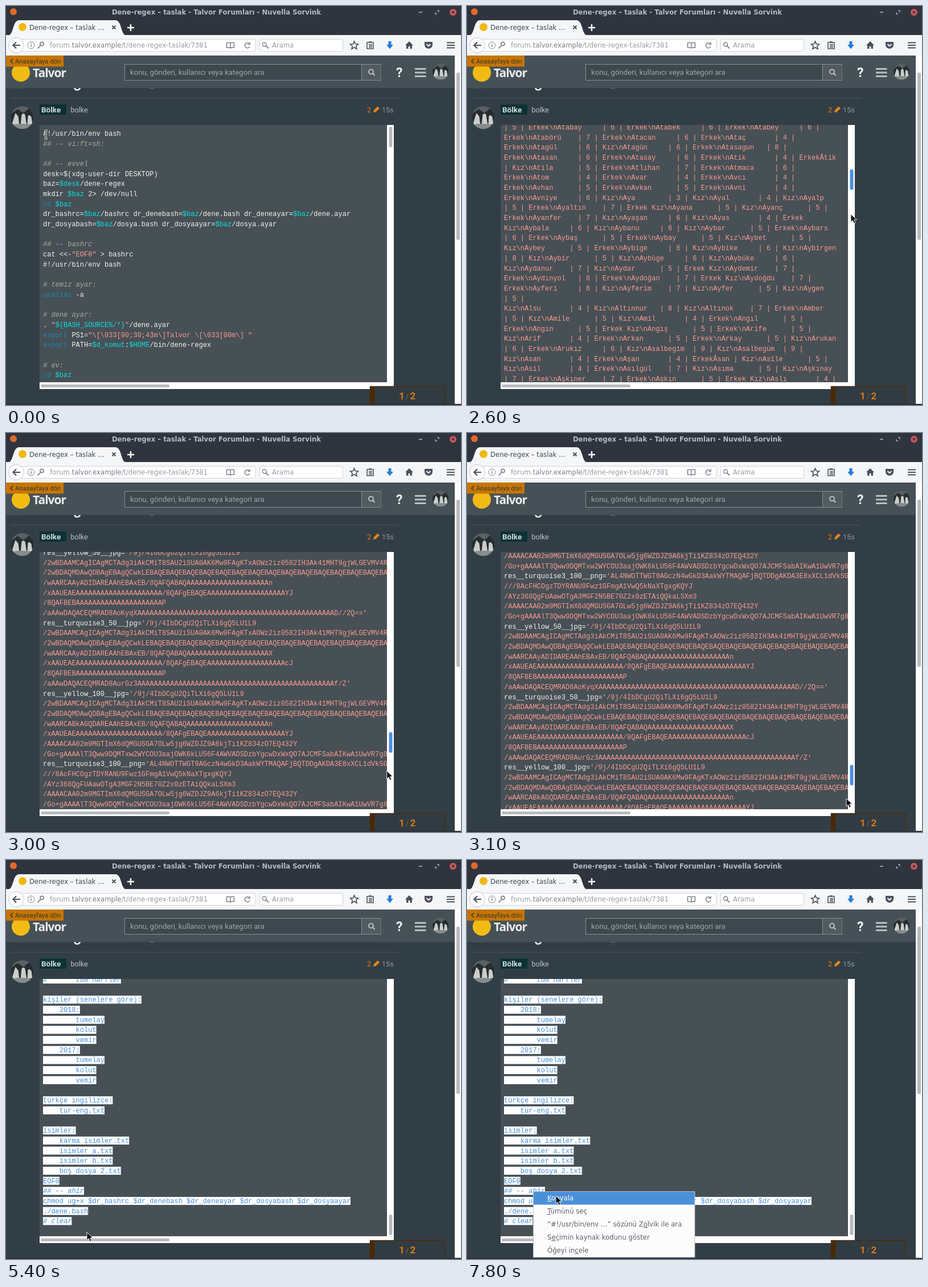
These frames come from a looping animation (799x701 px, 8000 ms). An HTML page:

```html
<!DOCTYPE html>
<html lang="tr">
<head>
<meta charset="utf-8">
<title>Forum</title>
<style>
html, body { margin: 0; width: 100%; height: 100%; overflow: hidden; background: #323e45; }
svg { display: block; }
text { white-space: pre; }
.ui { font: 11.7px "DejaVu Sans", sans-serif; fill: #5c616c; }
.web { font: 12.6px Roboto, sans-serif; fill: #b9c0c4; }
.code { font: 12px "Liberation Mono", monospace; fill: #f4f4ee; }
.com { fill: #aaab96; font-style: italic; }
.key { fill: #1b86b4; }
.var { fill: #08dede; }
.str { fill: #f69a90; }
.sel, .sel tspan { fill: #4590d8; }
.acc { text-decoration: underline; }
.line { fill: none; stroke: #4b505b; stroke-width: 1.6; }
</style>
</head>
<body>
<svg id="stage" width="799" height="701" viewBox="0 0 799 701">
  <defs>
    <clipPath id="round"><circle r="20"/></clipPath>
    <g id="photo" clip-path="url(#round)">
      <rect x="-20" y="-20" width="40" height="40" fill="#596062"/>
      <path d="M-20 -6L-8 -15L2 -8L12 -16L20 -7V20H-20Z" fill="#272d2f"/>
      <path d="M-17 8L-12 -8L-7 -2L-5 14H-18ZM-3 14L-1 -5Q2 -9 5 -5L8 14ZM9 12L10 -3Q13 -6 16 -1L18 12Z" fill="#c9cecb"/>
      <path d="M-20 13Q0 8 20 14V20H-20Z" fill="#868d8c"/>
    </g>
  </defs>

  <!-- window title and tab -->
  <rect width="799" height="52" fill="#2f343f"/>
  <circle cx="13" cy="10" r="6" fill="#e0692c"/>
  <text class="ui" x="369.5" y="15" text-anchor="middle" font-weight="bold" style="font-weight:bold;fill:#b4bac6">Dene-regex – taslak - Talvor Forumları - Nuvella Sorvink</text>
  <path d="M725 11H731" stroke="#a9afbb" stroke-width="1.6"/>
  <path d="M757 8H760V11M754 11V14H757" fill="none" stroke="#a9afbb" stroke-width="1.3"/>
  <circle cx="785" cy="11" r="6" fill="#cc575d"/>
  <path d="M783 9L787 13M787 9L783 13" stroke="#2f343f" stroke-width="1.5"/>
  <path d="M3 52C14 52 11 25 23 25H192C204 25 201 52 212 52Z" fill="#f5f6f7"/>
  <circle cx="29" cy="37" r="7" fill="#efb913"/>
  <text class="ui" x="41" y="42" style="fill:#434853">Dene-regex – taslak …</text>
  <path d="M186.500 34.500L192.500 40.500M192.500 34.500L186.500 40.500" stroke="#4b505b" stroke-width="2"/>
  <path d="M213 38H225M219 32V44" stroke="#fff" stroke-width="2.4"/>

  <!-- toolbar -->
  <rect y="51" width="799" height="36" fill="#f5f6f7"/>
  <rect x="22" y="58.500" width="416" height="21" rx="2" fill="#fff" stroke="#cfd3dc"/>
  <rect x="445.500" y="58.500" width="146" height="21" rx="2" fill="#fff" stroke="#cfd3dc"/>
  <circle cx="18" cy="69" r="13.500" fill="#fcfcfd" stroke="#c4c9d2"/>
  <path class="line" d="M25 69H13M18 63.500L12.500 69L18 74.500" style="stroke-width:2.200"/>
  <circle cx="44" cy="69" r="6" fill="none" stroke="#80858e"/>
  <path d="M44 67.500V72M44 65V66.200" stroke="#80858e" stroke-width="1.500"/>
  <circle cx="63" cy="66.500" r="3" fill="none" stroke="#8b9098" stroke-width="2"/>
  <path d="M61 69L55.500 74.500" stroke="#8b9098" stroke-width="2"/>
  <text class="ui" x="77" y="73" style="fill:#979ba3">forum.<tspan fill="#777c85">talvor.example</tspan>/t/dene-regex-taslak/7381</text>
  <path class="line" d="M394 65V74M387.500 64.500Q391 63.500 394 65.500Q397 63.500 400.500 64.500V73Q397 72.500 394 74Q391 72.500 387.500 73Z" style="stroke-width:1.300;stroke:#6b707a"/>
  <path class="line" d="M427 66A4.500 4.500 0 1 0 428 71M428 63.500V67.500H424" style="stroke:#80858e"/>
  <circle cx="454" cy="67.500" r="3.500" fill="none" stroke="#80858e" stroke-width="1.500"/>
  <path d="M456.500 70L461 74.500" stroke="#80858e" stroke-width="2"/>
  <text class="ui" x="467" y="73" style="fill:#979ba3">Arama</text>
  <path class="line" d="M611.500 62L613.500 66.800L618.500 67.200L614.700 70.500L616 75.500L611.500 72.800L607 75.500L608.300 70.500L604.500 67.200L609.500 66.800Z"/>
  <path class="line" d="M634 64H645V75H634ZM637 63H642M637 67.500H643M637 70H643M637 72.500H643"/>
  <path d="M671.500 62H676.500V68H680L674 75.500L668 68H671.500Z" fill="#1f7fdd"/>
  <path d="M708 62L715 69H713V75H709.500V71H706.500V75H703V69H701Z" fill="#4b505b"/>
  <path d="M735 63H749V68A7 7 0 0 1 735 68Z" fill="#4b505b"/>
  <path d="M738.500 67L742 70.500L745.500 67" fill="none" stroke="#fff" stroke-width="1.800"/>
  <path d="M774 64.500H788M774 69H788M774 73.500H788" stroke="#4b505b" stroke-width="2.200"/>

  <!-- page -->
  <rect y="87" width="788" height="614" fill="#323e45"/>
  <path d="M8 142H31V144.500H8Z" fill="#4f5a61"/>
  <path d="M120 143Q121 147.500 125 147.500Q130 147.500 130 142" fill="none" stroke="#e8ecec" stroke-width="2.600"/>
  <path d="M252 144.500H260" stroke="#69747a"/>
  <path d="M8 162H691" stroke="#4a555b"/>
  <rect y="87" width="788" height="57" fill="#465157"/>
  <circle cx="26" cy="117" r="16" fill="#f2bb14"/>
  <text x="47" y="125" style="font:bold 21px 'Open Sans',sans-serif;fill:#e9ecec" letter-spacing="-1">Talvor</text>
  <rect y="87" width="101" height="19.500" fill="#c67503"/>
  <path d="M12 93L8 97L12 101" fill="none" stroke="#33383a" stroke-width="1.600"/>
  <text class="web" x="16" y="101" style="font-size:11.300px;fill:#33383a">Anasayfaya dön</text>
  <rect x="208.500" y="102.500" width="450" height="28" fill="#3d484e" stroke="#869095"/>
  <rect x="625" y="103" width="33.500" height="27" fill="#515b60"/>
  <path d="M624.500 103V130" stroke="#869095"/>
  <text class="web" x="218" y="121" style="font-size:13.200px;fill:#9ca4a8">konu, gönderi, kullanıcı veya kategori ara</text>
  <circle cx="641" cy="115.500" r="4" fill="none" stroke="#b9c0c4" stroke-width="2"/>
  <path d="M644 118.500L647.500 122" stroke="#b9c0c4" stroke-width="2.300"/>
  <text x="685" y="125" style="font:bold 23px Roboto,sans-serif;fill:#eef0f0">?</text>
  <path d="M718 110.500H737.500M718 117H737.500M718 123.500H737.500" stroke="#b9c0c4" stroke-width="2.800"/>
  <use href="#photo" transform="translate(763 115.500) scale(.7)"/>
  <use href="#photo" transform="translate(28.500 196)"/>
  <rect x="59" y="173" width="47" height="18" fill="#0b3237"/>
  <text class="web" x="62" y="187" style="font-weight:bold;font-size:13.500px;fill:#d3dadb">Bölke</text>
  <text class="web" x="113.500" y="187">bolke</text>
  <text class="web" x="634" y="187" style="font-size:13px;fill:#dc7c1b">2</text>
  <path d="M645 187L646 183L652.500 176.500L656 180L649 186.500Z" fill="#e8841c"/>
  <text class="web" x="660" y="187" style="fill:#8d979c">15s</text>

  <!-- code box -->
  <rect x="59" y="209" width="622" height="464" fill="#fff"/>
  <rect x="59" y="209" width="610" height="452" fill="#475055"/>
  <svg id="view" class="code" x="59" y="209" width="610" height="452" viewBox="59 209 610 452"></svg>
  <rect x="61" y="665" width="226" height="5" rx="2.500" fill="#b8babf"/>
  <rect id="thumb" x="672.500" width="6" height="36" rx="3"/>
  <g id="quote">
    <rect x="65" y="178" width="62" height="34.500" fill="#fff" opacity=".5"/>
    <path d="M74 195Q74 190 79 190V192Q77 192 77 194H79V199H74ZM80.500 195Q80.500 190 85.500 190V192Q83.500 192 83.500 194H85.500V199H80.500Z" fill="#f2f4f4"/>
    <text class="web" x="89.500" y="199.500" style="fill:#f2f4f4">Alıntı</text>
  </g>

  <!-- counter, page scrollbar, window edge -->
  <rect x="639.500" y="668.500" width="131" height="34" fill="#313c42" stroke="#4a2c0c" stroke-width="1.500"/>
  <rect x="639" y="668" width="8.500" height="33" fill="#4a2a05"/>
  <text x="690" y="691" style="font:bold 17px Roboto,sans-serif;fill:#d97a13">1</text>
  <text x="702" y="690" style="font:12px Roboto,sans-serif;fill:#a8631c">/</text>
  <text x="709.500" y="691" style="font:bold 17px Roboto,sans-serif;fill:#d97a13">2</text>
  <rect x="788" y="87" width="11" height="612" fill="#fcfcfc"/>
  <rect x="791" y="117" width="6" height="294" rx="3" fill="#b8babf"/>
  <rect y="699" width="799" height="2" fill="#2b303a"/>

  <g id="menu" class="ui">
    <rect x="116.500" y="582.500" width="283.500" height="115.500" fill="#fcfcfd" stroke="#b9bec8"/>
    <rect id="hover" x="117" y="583" width="282.500" height="22.500" fill="#4a90d9"/>
    <text id="copy" x="141" y="598"><tspan class="acc">K</tspan>opyala</text>
    <text x="141" y="621"><tspan class="acc">T</tspan>ümünü seç</text>
    <text x="141" y="644">“#!/usr/bin/env …” sözünü Z<tspan class="acc">o</tspan>lvik ile ara</text>
    <text x="141" y="667">S<tspan class="acc">e</tspan>çimin kaynak kodunu göster</text>
    <text x="141" y="690">Öğeyi in<tspan class="acc">c</tspan>ele</text>
  </g>
  <path id="arrow" d="M0 0V14L3.300 11L5.700 16.300L8.200 15.200L5.900 10H10.500Z" fill="#0c0d0e" stroke="#e9eaea"/>
  <g id="beam" fill="none">
    <path d="M-3 -7H3M-3 7H3M0 -7V7" stroke="#fff" stroke-width="3"/>
    <path d="M-3 -7H3M-3 7H3M0 -7V7" stroke="#111" stroke-width="1.200"/>
  </g>
</svg>
<script>
const LOOP = 8000, STEP = 100, PITCH = 17.68, CHAR = 7.2, LEFT = 65;
const $ = id => document.getElementById(id);

const script = String.raw`#!/usr/bin/env bash
## -- vi:ft=sh:

## -- evvel
desk=$(xdg-user-dir DESKTOP)
baz=$desk/dene-regex
mkdir $baz 2> /dev/null
cd $baz
dr_bashrc=$baz/bashrc dr_denebash=$baz/dene.bash dr_deneayar=$baz/dene.ayar
dr_dosyabash=$baz/dosya.bash dr_dosyaayar=$baz/dosya.ayar

## -- bashrc
cat <<-"EOF0" > bashrc
#!/usr/bin/env bash

# temiz ayar:
unalias -a

# dene ayar:
. "${"$"}{BASH_SOURCE%/*}"/dene.ayar
export PS1="\[\033[00;30;43m\]Talvor \[\033[00m\] "
export PATH=$d_komut:$HOME/bin/dene-regex

# ev:
cd $baz
`.split("\n");

const people = ["tumelay", "kolut", "vemir"].map(n => "        " + n);
const ending = ["#       tüm harfler", "", "kişiler (senelere göre):",
  "    2018:", ...people, "    2017:", ...people, "",
  "türkçe ingilizce:", "    tur-eng.txt", "",
  "isimler:", "    karma isimler.txt", "    isimler a.txt", "    isimler b.txt", "    boş dosya 2.txt",
  "EOF0", "## -- ahir",
  "chmod ug+x $dr_bashrc $dr_denebash $dr_deneayar $dr_dosyabash $dr_dosyaayar",
  "./dene.bash", "# clear"];

// Word list: k, e, b mark the label, x a row without a line break and count.
const words = `kAlsu kAltınnur kAltınok eAmber kAmile kAmil eAngıl eAngın bAngış eArife kArif eArkan eArkay kArukan
eArukız kAsalbegim kAsalbegüm kAsan eAşan xÂsan kAsile kAsil eAsılgül kAsıma kAşkınay eAşkıner eAşkın bAslı
kAslım kAslınur kAsliye kAtaan eAtabay eAtabek eAtabey eAtabörü eAtacan eAtaç eAtagül kAtagün eAtasagun
eAtasan eAtasay eAtik xÂtik kAtila eAtlıhan eAtmaca eAtom eAvar eAvcı eAvhan eAvkan eAvni eAvniye kAya kAyal
kAyalp eAyaltın bAyana kAyanç eAyanfer kAyaşan kAyas bAybala kAybanu kAybar eAybars eAybaş eAybay kAybet
kAybey eAybige kAybike kAybirgen kAybir kAybüge kAybüke kAydanur kAydar bAydemir eAydınyol eAydoğan bAydoğdu
eAyferi kAyferim kAyfer kAygen`.split(/\s+/);
const label = { k: "Kız", e: "Erkek", b: "Erkek Kız" };

function wrap(text, max) {
  const rows = [""];
  for (const part of text.match(/\s*\S+/g)) {
    const last = rows.length - 1;
    if ((rows[last] + part).length > max) rows.push(part.trimStart());
    else rows[last] += part;
  }
  return rows;
}
const names = wrap(words.map(w => {
  const name = w.slice(1);
  return w[0] === "x" ? `Erkek${name} | `
    : `${label[w[0]]}\\n${name.padEnd(11)}| ${name.length} | `;
}).join(""), 81);

// Seeded gibberish; the same length always gives the same row.
function noise(len) {
  const set = "AAAAABCDEFGHIJKLMNOQRSTUVWXYZabcdgijkmwxz0123456789gMTDAwQ";
  let seed = len * 7919, out = "";
  while (out.length < len) {
    seed = (seed * 48271 + 11) % 2147483647;
    out += set[seed % set.length];
  }
  return out;
}
const A = n => "A".repeat(n);
const dump = (name, size, mark, end, tail) => [
  `res__${name}__jpg='/9j/4${noise(22)}`,
  "/2wBDAAMCAgICAgMC" + noise(68),
  "/2wBDAQMDAwQDBAgEBAgQCwkL" + "EBAQ".repeat(15),
  `/wAARCA${size}DAREAAhEBAxEB/8QAFQABAQ${A(20)}${mark}`,
  `/xAAUEAE${A(21)}/8QAFgEBAQE${A(19)}${end}`,
  `/8QAFBEB${A(21)}P`,
  `/aAAwDAQACEQMRAD8A${tail[0]}${A(48)}${tail[1]}'`];
const pair = ["/AAAAC" + noise(56), "/Go+gAAAAl" + noise(75)];
const blobs = [...pair,
  "res__turquoise3_100__png='" + noise(61), "///8" + noise(42), "/" + noise(46), ...pair,
  ...dump("yellow_50", "AyADI", "n", "YJ", ["oKyqX", "D//2Q=="]),
  ...dump("turquoise3_50", "AyADI", "X", "cJ", ["urGz3", "f/Z"]),
  ...dump("yellow_100", "BkAGQ", "n", "YJ", ["oKyqX", "D//2Q=="])].slice(0, 26);

const esc = s => s.replace(/&/g, "&amp;").replace(/</g, "&lt;").replace(/>/g, "&gt;");
const span = (cls, s) => `<tspan class="${cls}">${s}</tspan>`;

function paintScript(row) {
  return esc(row).replace(/^#(?!!).*|^(?:cd|unalias|export)\b|"[^"]*"|\$\w+/g, s =>
    s[0] === "#" ? span("com", s)
    : s[0] === "$" ? span("var", s)
    : s[0] === '"' ? span("str", s.replace(/\$\{.*?\}/, v => span("var", v)))
    : span("key", s));
}
const paintData = row => {
  const [, head, rest] = row.match(/^(res\w+=)?(.*)$/);
  return (head || "") + span("str", esc(rest));
};

const mark = (y, n) => `<rect x="${LEFT}" y="${y - 11}" width="${n * CHAR}" height="14" fill="#fff"/>`;

function page(rows, paint, y0, sel) {
  return rows.map((row, i) => {
    const y = +(y0 + i * PITCH).toFixed(2);
    const line = (cls, s) => `<text xml:space="preserve" class="${cls}" x="${LEFT}" y="${y}">${s}</text>`;
    if (sel === "all") return row && mark(y, row.length) + line("sel", paint(row));
    const out = line("", paint(row));
    return sel === "word" && !i ? out + mark(y, 3) + line("sel", row.slice(0, 3)) : out;
  }).join("");
}
const turn = (rows, n) => [...rows.slice(n), ...rows.slice(0, n)];

const pages = {
  start: page(script, paintScript, 228),
  word: page(script, paintScript, 228, "word"),
  drag0: page(turn(script, 4), paintScript, 220),
  drag1: page(turn(names, 9), paintData, 217),
  drag2: page(turn(names, 17), paintData, 211),
  drag3: page(names, paintData, 213.700),
  drag4: page(turn(names, 5), paintData, 218),
  drag5: page(turn(blobs, 7), paintData, 214),
  drag6: page(blobs, paintData, 220),
  drag7: page(turn(blobs, 14), paintData, 216),
  end: page(ending, paintScript, 214),
  all: page(ending, paintScript, 214, "all")
};

const pointer = [[0, 70, 226], [1100, 70, 226], [1200, 96, 220], [1300, 180, 250], [1400, 330, 305],
  [1500, 480, 320], [1600, 590, 300], [1700, 659, 268], [1900, 674, 243], [2000, 674, 234],
  [2200, 674, 241], [2400, 674, 241], [2500, 674, 300], [2800, 674, 497], [3100, 666, 642],
  [3300, 668, 655], [3400, 669, 657], [3500, 669, 657], [3600, 671, 658], [3700, 671, 658],
  [3800, 563, 649], [4100, 270, 647], [4400, 139, 652], [4800, 139, 652], [5000, 142, 654],
  [6000, 142, 654], [6500, 114, 582], [7300, 114, 582], [7800, 156, 590]];
const slide = [[2400, 212], [2500, 225], [2800, 411], [3100, 583], [3200, 612], [3300, 623]];

function at(keys, t, n) {
  const i = keys.findIndex(k => k[0] > t);
  if (i < 0) return keys[keys.length - 1][n];
  if (!i) return keys[0][n];
  const a = keys[i - 1], b = keys[i];
  return a[n] + (b[n] - a[n]) * (t - a[0]) / (b[0] - a[0]);
}
const pageAt = t => t < 800 ? "start" : t < 2500 ? "word"
  : t < 3300 ? "drag" + (t - 2500) / STEP : t < 5400 ? "end" : "all";
const show = (id, on) => $(id).setAttribute("visibility", on ? "visible" : "hidden");

let shown;
function draw(t) {
  const name = pageAt(t);
  if (name !== shown) $("view").innerHTML = pages[shown = name];

  $("thumb").setAttribute("y", at(slide, t, 1));
  $("thumb").setAttribute("fill", t >= 2500 && t < 3800 ? "#4a90e2" : t >= 2000 && t < 2500 ? "#989ca3" : "#b8babf");
  show("quote", t >= 900 && t < 2500);

  const x = at(pointer, t, 1), y = at(pointer, t, 2);
  const beam = t < 1300 || (t >= 6200 && t < 6800);
  for (const id of ["arrow", "beam"]) $(id).setAttribute("transform", `translate(${x} ${y})`);
  show("beam", beam);
  show("arrow", !beam);

  const menu = t >= 6800, over = menu && x > 117;
  show("menu", menu);
  show("hover", over);
  $("copy").style.fill = over ? "#fff" : "";
}

function tick(now) {
  draw(Math.floor(now % LOOP / STEP) * STEP);
  requestAnimationFrame(tick);
}
draw(0);
requestAnimationFrame(tick);
</script>
</body>
</html>
```
